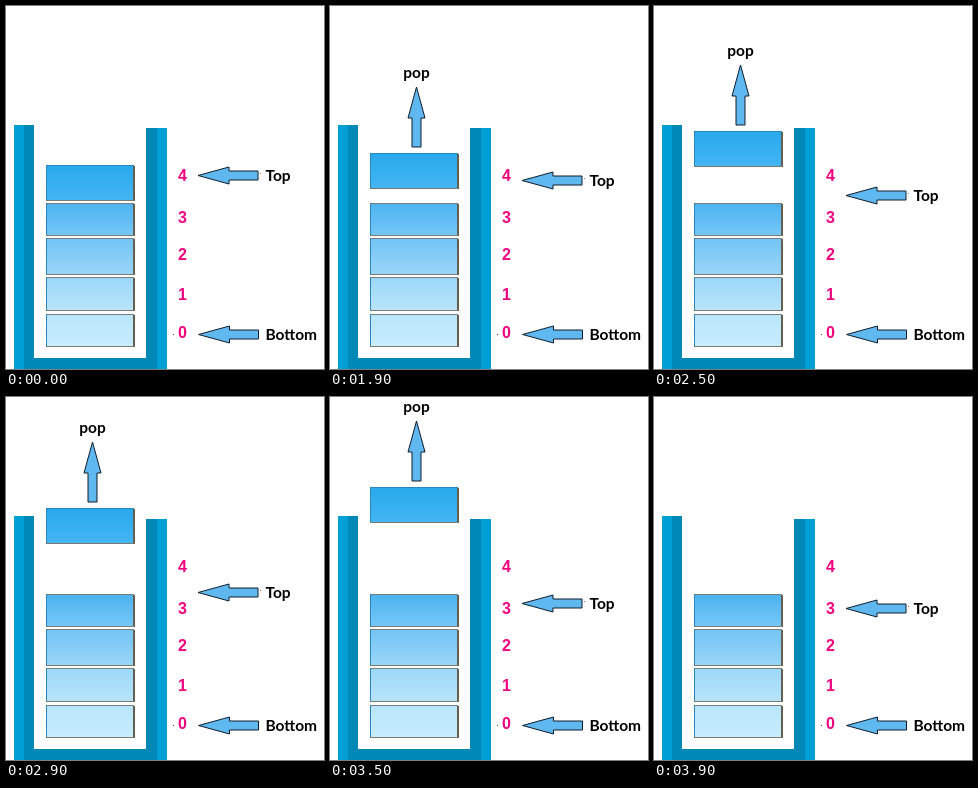
An HTML page for the animation above (5400 ms loop, 318x363 px).

```html
<!DOCTYPE html>
<html lang="en">
<head>
<meta charset="utf-8">
<title>Stack pop</title>
<style>
  html, body { margin: 0; width: 100%; height: 100%; overflow: hidden; background: #fff; }
  svg { display: block; width: 318px; height: 363px; }
  .label { font: bold 15.5px Lato, Carlito, sans-serif; fill: #000; }
  .index { font: bold 16px "Liberation Sans", Arial, sans-serif; fill: #f0047f; }
  .arrow { fill: #60b8f0; stroke: #111c28; stroke-width: 1; }
  .light { fill: #009fd5; }
  .dark { fill: #0088b7; }
</style>
</head>
<body>
<svg viewBox="0 0 318 363">
  <defs>
    <path id="arrow" class="arrow" d="M0 0 L31 -8.5 V-4.5 H60 V4.5 H31 V8.5 Z"/>
  </defs>

  <path class="light" d="M8 119H18V363H8Z M151 122H161V363H151Z"/>
  <path class="dark" d="M18 119H28V352H140V122H151V363H18Z"/>

  <g id="blocks"></g>
  <g id="indexes" class="index"></g>

  <use href="#arrow" x="192.5" y="328.5"/>
  <rect x="167" y="328" width="1" height="1" fill="#555"/>
  <text class="label" x="259.5" y="334">Bottom</text>

  <g id="top">
    <use href="#arrow" x="192" y="169.5"/>
    <rect x="254" y="167" width="1" height="1" fill="#777"/>
    <text class="label" x="259.5" y="175">Top</text>
  </g>

  <g id="pop">
    <use href="#arrow" transform="translate(86.5 93) rotate(90)"/>
    <text class="label" x="86.5" y="84" text-anchor="middle">pop</text>
  </g>
</svg>
<script>
  const LOOP = 5400, START = 1500, STEP = 200;
  const rise = [0, 5, 12, 19, 26, 34, 41, 48, 58, 63, 69, 73];
  const sink = [0, 2, 5, 10, 13, 20, 22, 26, 28, 31, 37, 42];

  // top, bottom, upper colour, lower colour, index baseline
  const rows = [
    [308, 341, "#b8e5fa", "#c8edfe", 332],
    [271, 305, "#9bd8f8", "#b8e5fb", 294],
    [232, 269, "#72c3f4", "#9ad6f9", 254],
    [197, 230, "#4cb3f0", "#76c7f7", 217],
    [159, 195, "#27a9ec", "#45b6f3", 175]
  ];

  const $ = id => document.getElementById(id);

  function add(parent, tag, attrs) {
    const el = document.createElementNS("http://www.w3.org/2000/svg", tag);
    for (const name in attrs) el.setAttribute(name, attrs[name]);
    return parent.appendChild(el);
  }

  function addBlock([top, bottom, from, to], i) {
    const g = add($("blocks"), "g", {});
    const fill = add(g, "linearGradient", { id: "fill" + i, x2: 0, y2: 1 });
    add(fill, "stop", { offset: 0, "stop-color": from });
    add(fill, "stop", { offset: 1, "stop-color": to });
    const box = (x, y, w, h, color) => add(g, "rect", { x, y, width: w, height: h, fill: color });
    box(40, top, 88, bottom - top, `url(#fill${i})`);
    box(40, top, 88, 1, i < 4 ? "#7b7d7c" : "#2788bd");
    box(40, top, 1, bottom - top, "#2b86bd");
    box(127, top + 1, 2, bottom - top - 1, "#665f50");
    box(40, bottom - 1, 88, 1, "#7d7a70");
    return g;
  }

  const blocks = rows.map(addBlock);
  rows.forEach((row, i) => add($("indexes"), "text", { x: 172, y: row[4] }).textContent = i);
  const popped = blocks[4];

  const shift = (el, y) => el.setAttribute("transform", `translate(0 ${y})`);
  const show = (el, on) => el.setAttribute("visibility", on ? "visible" : "hidden");

  function draw(now) {
    const step = Math.floor((now % LOOP - START) / STEP);
    const last = rise.length - 1;
    const k = Math.max(0, Math.min(last, step));
    shift(popped, -rise[k]);
    shift($("pop"), -rise[k]);
    shift($("top"), sink[k]);
    show(popped, step <= last);
    show($("pop"), step >= 0 && step <= last);
  }

  const origin = performance.now();
  function tick() {
    draw(performance.now() - origin);
    requestAnimationFrame(tick);
  }
  tick();
</script>
</body>
</html>
```
